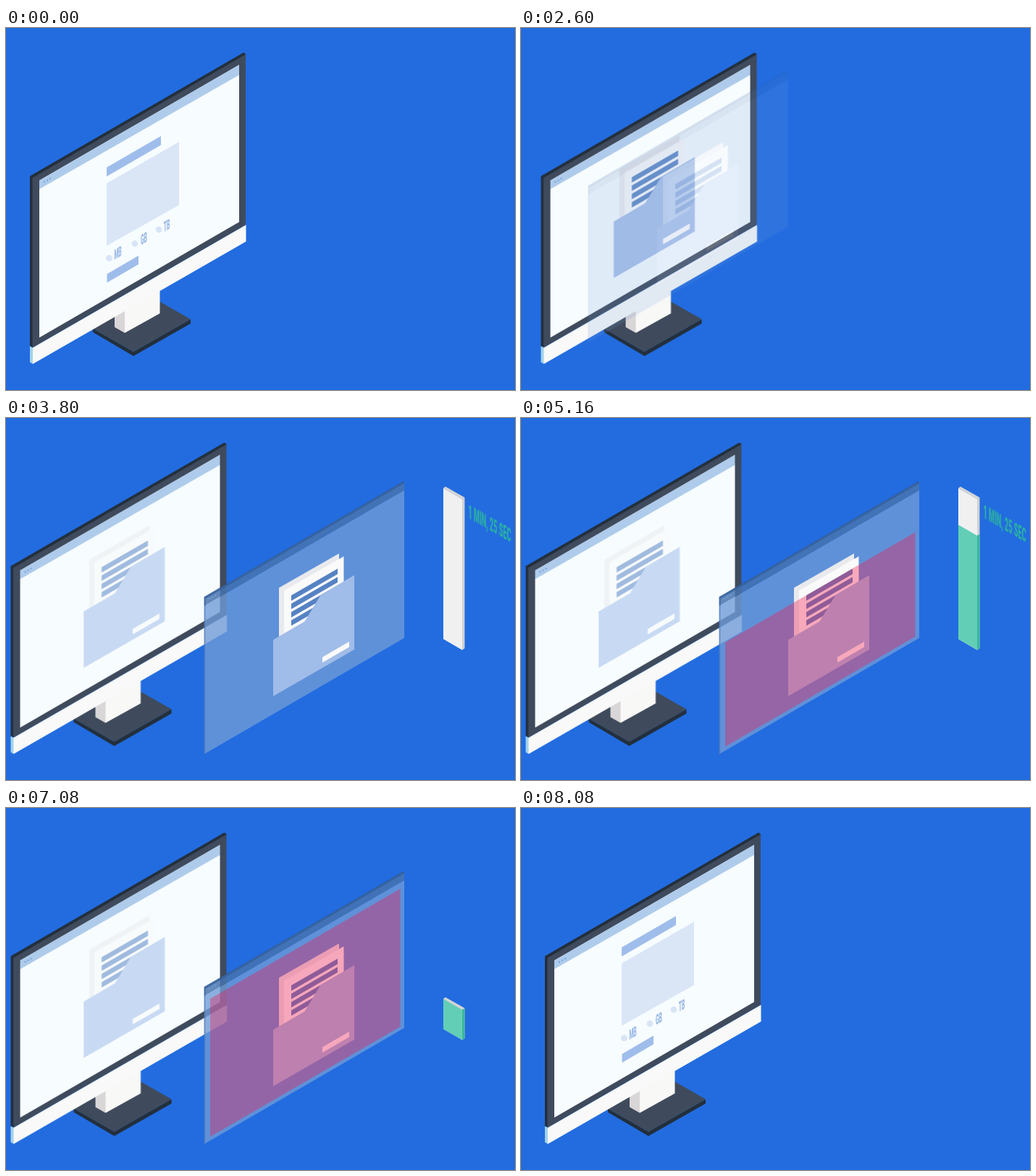
An HTML page for the animation above (8320 ms loop, 703 px wide and 501 px high).

```html
<!DOCTYPE html>
<html lang="en">
<head>
<meta charset="utf-8">
<title>Upload time</title>
<style>
  html, body { margin: 0; width: 100%; height: 100%; overflow: hidden; background: #226ce0; }
  svg { display: block; width: 100vw; height: 100vh; }
  text { font-family: Roboto, "Liberation Sans", sans-serif; font-weight: 900; }

  /* every animated part shares one 8320 ms loop */
  .a { animation: 8320ms linear infinite both; }
  .monitor { animation-name: monitor; }
  .window { animation-name: window; }
  .dim { animation-name: dim; }
  .form { animation-name: form; }
  .folder { animation-name: folder; }
  .number { animation-name: number; }
  .check { animation-name: check; }
  .dot { animation-name: dot; }
  .fill { animation-name: fill; }
  .bar { animation-name: bar; }
  .cap { animation-name: cap; }
  .grow { animation-name: grow; }
  .time { animation-name: time; }
  .monitor, .window, .dim, .fill, .cap, .grow { animation-timing-function: cubic-bezier(.37, 0, .63, 1); }
  .fill, .grow { transform-box: fill-box; transform-origin: 50% 100%; }

  @keyframes number {
    0%, .24% { opacity: 0; }
    3.37%, 25% { opacity: 1; }
    25.1%, 100% { opacity: 0; }
  }
  @keyframes check {
    0%, 7.45% { opacity: 0; }
    10.58%, 25% { opacity: 1; }
    25.1%, 100% { opacity: 0; }
  }
  @keyframes dot {
    0%, 7.45% { opacity: 1; }
    10.58%, 25% { opacity: 0; }
    25.1%, 100% { opacity: 1; }
  }
  @keyframes form {
    0%, 15.63% { transform: none; opacity: 1; }
    20.91%, 95.43% { transform: translateX(-47px); opacity: 0; }
    97.12%, 100% { transform: none; opacity: 1; }
  }
  @keyframes folder {
    0%, 20.91% { transform: translateX(-68px); opacity: 0; }
    24.5% { transform: translateX(5px); opacity: 1; }
    25.96%, 93.99% { transform: none; opacity: 1; }
    95.67%, 100% { transform: translateX(-76px); opacity: 0; }
  }
  @keyframes monitor {
    0%, 29.81% { transform: none; }
    34.62%, 85.1% { transform: translateX(-26.5px); }
    89.42%, 100% { transform: none; }
  }
  @keyframes window {
    0%, 29.81% { transform: translate(-228px, -37px); opacity: 0; }
    34.62%, 85.1% { transform: none; opacity: 1; }
    89.42%, 100% { transform: translate(-228px, -37px); opacity: 0; }
  }
  @keyframes dim {
    0%, 29.81% { opacity: 1; }
    34.62%, 85.1% { opacity: .54; }
    89.42%, 100% { opacity: 1; }
  }
  @keyframes fill {
    0%, 45.43% { transform: scaleY(0); }
    70.19%, 90% { transform: none; }
    90.1%, 100% { transform: scaleY(0); }
  }
  @keyframes bar {
    0%, 34.62% { opacity: 0; }
    34.7%, 86.5% { opacity: 1; }
    86.54%, 100% { opacity: 0; }
  }
  @keyframes grow {
    0%, 34.62% { transform: scaleY(0); }
    39.66%, 81.73% { transform: none; }
    86.54%, 100% { transform: scaleY(0); }
  }
  @keyframes cap {
    0%, 34.62% { transform: translateY(209px); }
    39.66%, 81.73% { transform: none; }
    86.54%, 100% { transform: translateY(209px); }
  }
  @keyframes time {
    0%, 39.54% { clip-path: inset(-9px 100% -9px 0); }
    42.31%, 78.61% { clip-path: inset(-9px 0 -9px 0); }
    81.25%, 100% { clip-path: inset(-9px 100% -9px 0); }
  }
</style>
</head>
<body>
<svg viewBox="0 0 703 501">
  <defs>
    <g id="docs">
      <path fill="#e9eaed" d="M141.5 196l83-47.5v80l-83 48z"/>
      <path fill="#fafafa" d="M148.5 200l82.500-47.500v80l-82.500 48z"/>
      <g fill="#5682c3">
        <path id="line" d="M158.500 206.500l64-37v7.500l-64 37z"/>
        <use href="#line" y="11.500"/>
        <use href="#line" y="23"/>
        <use href="#line" y="34.500"/>
      </g>
      <path fill="#a0bce8" d="M133.500 268l43.500-25.500 22-36.500 46.500-27.500v103l-112 64.500z"/>
      <path fill="#fafafa" d="M201.500 292l37-21.500v7.500l-37 21.500z"/>
    </g>
    <g id="dots">
      <circle cx="53" cy="213" r="1.200"/>
      <circle cx="57" cy="210.700" r="1.200"/>
      <circle cx="61" cy="208.400" r="1.200"/>
    </g>
  </defs>

  <g class="a monitor">
    <!-- stand -->
    <path fill="#232f3c" d="M120 416l56 32 79-45v6l-79 45-56-33z"/>
    <path fill="#3f4b5c" d="M120 416l79-45 56 32-79 45z"/>
    <path fill="#d9d6d8" d="M150 390l14-8v40l-14-8z"/>
    <path fill="#f8f8f7" d="M164 380l48.500-28v43l-48.500 27z"/>
    <!-- case -->
    <path fill="#232f3c" d="M33 205l295-171 3 2v4L37 442l-4-2z"/>
    <path fill="#3f4b5c" d="M36.500 207.500l294.500-171v236l-294.500 170z"/>
    <path fill="#a3d3ea" d="M33 440.500l4 2v22.500l-4-2.500z"/>
    <path fill="#f8f9f8" d="M37 442.500l294.500-170v23l-294.500 169.500z"/>
    <!-- screen -->
    <path fill="#f7fcff" d="M46 211l276-160v217.500l-276 160z"/>
    <path fill="#aecbeb" d="M46 211l276-160v14l-276 158z"/>
    <use href="#dots" fill="#7fa6dc"/>

    <g class="a form">
      <path fill="#9fbdeb" d="M139 193l75-43.500v12.500l-75 43.500zM139.500 340.500l43.500-25.500v12l-43.500 25.500z"/>
      <path fill="#dae6f6" d="M139 215l100-57.500v87.500l-100 56.500z"/>
      <g fill="#d8e5f6">
        <circle cx="142.500" cy="318.500" r="4.400"/>
        <circle class="a dot" cx="178" cy="298.500" r="4.400"/>
        <circle cx="211" cy="279" r="4.400"/>
      </g>
      <g fill="#98b7e6" font-size="19.500" text-anchor="middle">
        <text transform="matrix(.345 -.2 0 1 154.500 318)">MB</text>
        <text transform="matrix(.345 -.2 0 1 190.500 298)">GB</text>
        <text transform="matrix(.345 -.2 0 1 222 280)">TB</text>
      </g>
      <g class="a number" fill="#5682c3" font-size="82" text-anchor="middle">
        <text transform="matrix(.345 -.2 0 1 189.500 262)">25</text>
      </g>
      <path class="a check" fill="none" stroke="#e0484f" stroke-width="2.200" d="M174.500 295l3.500 7 6.500-16"/>
    </g>

    <g class="a folder"><g class="a dim"><use href="#docs"/></g></g>
  </g>

  <g class="a window">
    <path fill="#709bd8" fill-opacity=".8" d="M274 260l276-160v204.500l-276 160.500z"/>
    <path fill="#4875b0" fill-opacity=".85" d="M274 248l276-160v12l-276 160z"/>
    <path fill="#355f9a" fill-opacity=".8" d="M273.500 247.500l275-160 1.500 1v2L275.500 250v10h-2z"/>
    <path fill="#4f79b8" fill-opacity=".7" d="M273.500 260h1.800v204.500l-1.800 1z"/>
    <use href="#dots" x="228" y="37" fill="#6f9ad6"/>
    <use href="#docs" x="235.500" y="39"/>
    <g transform="matrix(1 -.58 0 1 282 264)">
      <rect class="a fill" width="262.500" height="191" fill="#f21c50" fill-opacity=".37"/>
    </g>
  </g>

  <g class="a bar">
    <g transform="matrix(1 .58 0 1 604 97)">
      <g class="a grow">
        <rect width="26.300" height="209" fill="#f0f0f0"/>
        <rect class="a fill" width="26.300" height="209" fill="#62ceb6"/>
      </g>
    </g>
    <g transform="matrix(1 -.58 0 1 630 112)">
      <g class="a grow">
        <rect width="3.500" height="209" fill="#d2d2d2"/>
        <rect class="a fill" width="3.500" height="209" fill="#3cb79b"/>
      </g>
    </g>
    <path class="a cap" fill="#d5d5d5" d="M604 97l3-2 26.500 15-3.500 2.300z"/>
  </g>

  <g transform="matrix(.345 .2 0 1 638.500 138)">
    <text class="a time" font-size="26.500" fill="#2ab2a0">1 MIN, 25 SEC</text>
  </g>
</svg>
</body>
</html>
```
